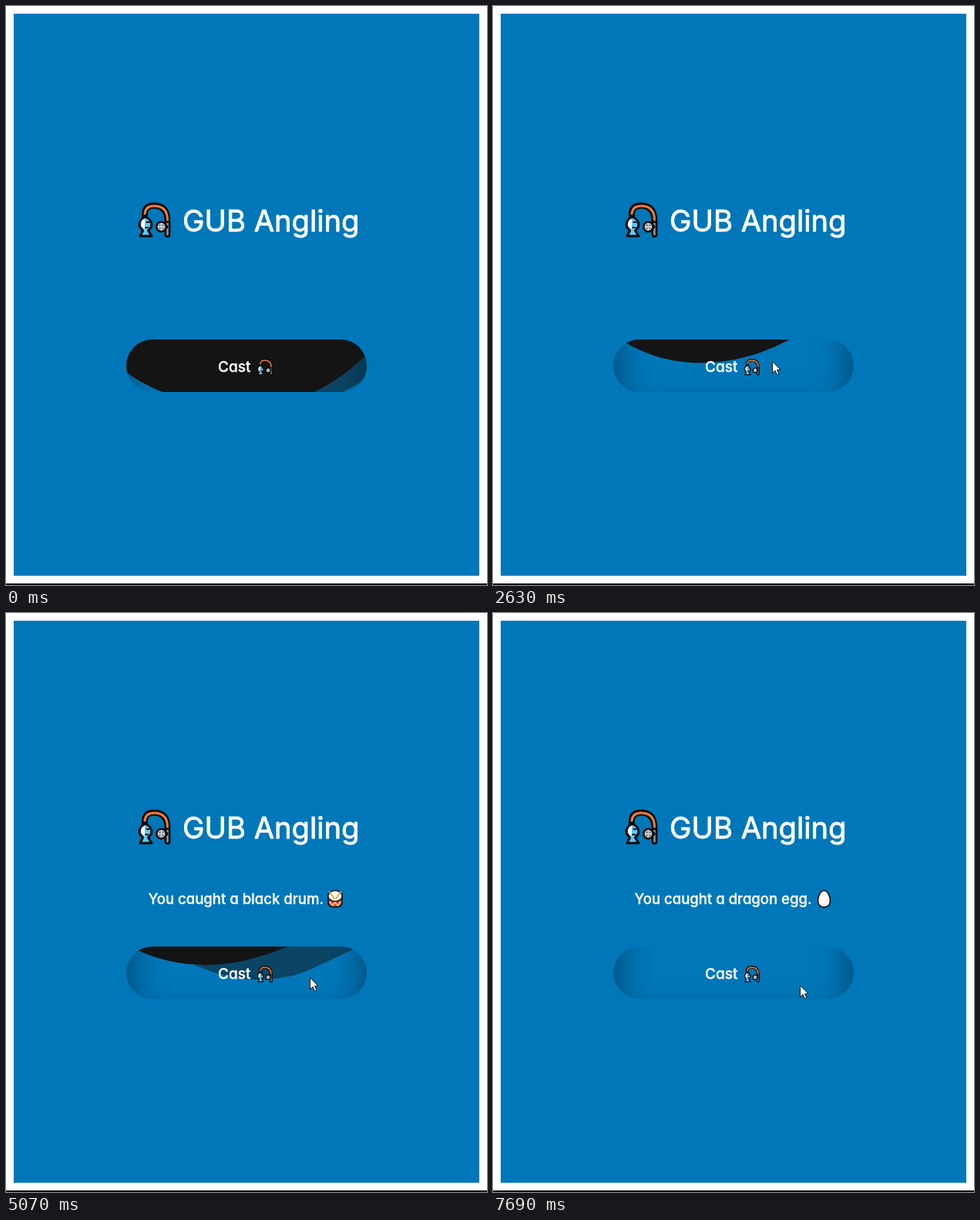
Recreate the animation shown at these times as an HTML page. Size 624 by 750 pixels, loop 8 s.

```html
<!DOCTYPE html>
<html lang="en">
<head>
<meta charset="utf-8">
<title>GUB Angling</title>
<style>
  html, body { margin: 0; width: 100%; height: 100%; overflow: hidden; background: #fff; }
  svg { display: block; width: 624px; height: 750px; }
  text {
    font-family: Inter, Lato, sans-serif; font-weight: 500; font-feature-settings: "cv11";
    fill: #fff; stroke: #fff; stroke-width: .35; stroke-linejoin: round;
  }
  .title { font-size: 38.2px; font-weight: 400; stroke-width: .8; }
  .label { font-size: 19px; }
  .note { font-size: 18.55px; }
</style>
</head>
<body>
<svg viewBox="0 0 624 750">
  <defs>
    <clipPath id="pill"><rect x="156" y="432" width="312" height="68" rx="34"/></clipPath>
    <filter id="soft" filterUnits="userSpaceOnUse" x="0" y="150" width="624" height="600">
      <feGaussianBlur stdDeviation="25"/>
    </filter>
    <g id="rod" fill="none" stroke-linecap="round" stroke-linejoin="round">
      <path d="M180 273V268Q181 258.500 192 258.500Q209.500 258.500 209.500 279V296" stroke="#0b0b0b" stroke-width="7.800"/>
      <path d="M180 269Q181 259 192 259Q209.500 259 209.500 277" stroke="#f47b3c" stroke-width="3"/>
      <path d="M209.500 282V296" stroke="#8d9499" stroke-width="2.600"/>
      <path d="M181 273C187 276 190 281 188.500 286L184.500 291L189 298H174L177.500 291L173.500 286C172 281 175 275 181 273Z"
            fill="#5cc8f5" stroke="#0b0b0b" stroke-width="3"/>
      <path d="M180 275.500C175 277 174 283 176 286L180 289Z" fill="#fff"/>
      <path d="M182.500 280H185.500M181 287H184" stroke="#0b0b0b" stroke-width="2"/>
      <path d="M202 286H208" stroke="#0b0b0b" stroke-width="5"/>
      <circle cx="201.500" cy="286" r="6.200" fill="#c9ced2" stroke="#0b0b0b" stroke-width="2.600"/>
      <path d="M199.500 284H199.600M203.500 284H203.600M199.500 288H199.600M203.500 288H203.600"
            stroke="#5b6166" stroke-width="2.200"/>
    </g>
  </defs>

  <rect x="10" y="10" width="604" height="728" fill="#0077b9"/>
  <rect y="748" width="624" height="2" fill="#000"/>

  <use href="#rod"/>
  <text class="title" x="229" y="292">GUB Angling</text>

  <g class="catch" visibility="hidden">
    <text class="note" x="196.500" y="377">You caught a flounder.</text>
    <circle cx="414" cy="370" r="10.400" fill="#f6bd3c" stroke="#111" stroke-width="1.700"/>
    <path d="M407.500 368.500H412M416 368.500H420.500M409 374H419" stroke="#222" stroke-width="1.700" stroke-linecap="round"/>
  </g>
  <g class="catch" visibility="hidden">
    <text class="note" x="184.500" y="377">You caught a black drum.</text>
    <path d="M418 367V376Q419 381 427 381Q435 381 436 376V367Z" fill="#e0432f" stroke="#111" stroke-width="1.500"/>
    <path d="M420 374L423.500 379L427 374.500L430.500 379L434 374" fill="none" stroke="#f6d9b0" stroke-width="1.500"/>
    <ellipse cx="427" cy="366.500" rx="9.200" ry="7" fill="#fff" stroke="#111" stroke-width="1.500"/>
    <path d="M419.500 361L426 370M434.500 361L428 370" stroke="#e3a23a" stroke-width="1.800" stroke-linecap="round"/>
  </g>
  <g class="catch" visibility="hidden">
    <text class="note" x="183.500" y="377">You caught a dragon egg.</text>
    <path d="M429.500 359.500C434 359.500 437.500 367 437.500 372.500C437.500 378 434 381 429.500 381C425 381 421.500 378 421.500 372.500C421.500 367 425 359.500 429.500 359.500Z"
          fill="#fff8f4" stroke="#111" stroke-width="1.700"/>
  </g>

  <g clip-path="url(#pill)">
    <g id="liquid">
      <path d="M0 180H624V760H0ZM156 330V580H468V330Z" fill-rule="evenodd" opacity=".5" filter="url(#soft)"/>
      <rect id="solid" x="-312" y="-250" width="624" height="500" rx="280.800" ry="225" fill="#141414"/>
      <rect id="sheer" x="-312" y="-250" width="624" height="500" rx="249.600" ry="200" fill="#141414" fill-opacity=".5"/>
    </g>
  </g>
  <text class="label" x="275" y="474">Cast</text>
  <use href="#rod" transform="translate(243.400 334.600) scale(.48)"/>

  <path id="cursor" d="M.5 .5V15.500L4 12.200L6.500 17.700L8.900 16.600L6.500 11.200H11Z"
        fill="#fff" stroke="#111" stroke-width="1"/>
</svg>
<script>
  const LOOP = 8000;
  const SPIN = 0.077;               // degrees per ms
  const START = 99;
  const LIFT = 49;                  // rise of the liquid on hover
  const EASE_MS = 500;
  const hovers = [[2130, 3720], [4470, 9000]];
  const catches = [2850, 4950, 6600, LOOP];
  const path = [                    // time, x, y of the pointer
    [600, 612, 462], [780, 552, 499], [1150, 470, 548], [1600, 398, 573],
    [1940, 376, 562], [2130, 368, 500], [2350, 362, 466], [2540, 362, 460],
    [3640, 362, 460], [3800, 377, 520], [4060, 401, 582], [4220, 406, 587],
    [4300, 406, 576], [4440, 402, 506], [4600, 397, 478], [4750, 394, 472],
    [6550, 394, 472], [6800, 398, 482], [LOOP, 398, 482]
  ];

  const $ = id => document.getElementById(id);
  const notes = document.querySelectorAll('.catch');
  const clamp = x => Math.min(1, Math.max(0, x));

  // cubic-bezier(.25, .1, .25, 1)
  function ease(x) {
    if (x <= 0 || x >= 1) return clamp(x);
    const curve = (s, a, b) => 3 * s * (1 - s) ** 2 * a + 3 * s * s * (1 - s) * b + s ** 3;
    let lo = 0, hi = 1;
    for (let i = 0; i < 20; i++) {
      const mid = (lo + hi) / 2;
      if (curve(mid, .25, .25) < x) lo = mid; else hi = mid;
    }
    return curve(lo, .1, 1);
  }

  const hoverAmount = t => hovers.reduce((sum, [on, off]) =>
    sum + ease((t - on) / EASE_MS) - ease((t - off) / EASE_MS), 0);

  function pointerAt(t) {
    const i = Math.max(1, path.findIndex(p => p[0] >= t));
    const [a, b] = [path[i - 1], path[i]];
    const k = clamp((t - a[0]) / (b[0] - a[0]));
    return [a[1] + (b[1] - a[1]) * k, a[2] + (b[2] - a[2]) * k];
  }

  function draw(t) {
    const angle = START + SPIN * t;
    const turn = (id, deg) => $(id).setAttribute('transform', `translate(312 205) rotate(${deg})`);
    turn('solid', angle);
    turn('sheer', angle / 2);
    $('liquid').setAttribute('transform', `translate(0 ${-LIFT * hoverAmount(t)})`);

    notes.forEach((note, i) => note.setAttribute('visibility',
      t >= catches[i] && t < catches[i + 1] ? 'visible' : 'hidden'));

    const [x, y] = pointerAt(t);
    $('cursor').setAttribute('transform', `translate(${x} ${y})`);
    $('cursor').setAttribute('visibility', t < path[0][0] ? 'hidden' : 'visible');
  }

  const begin = performance.now();
  function tick() {
    draw((performance.now() - begin) % LOOP);
    requestAnimationFrame(tick);
  }
  tick();
</script>
</body>
</html>
```
